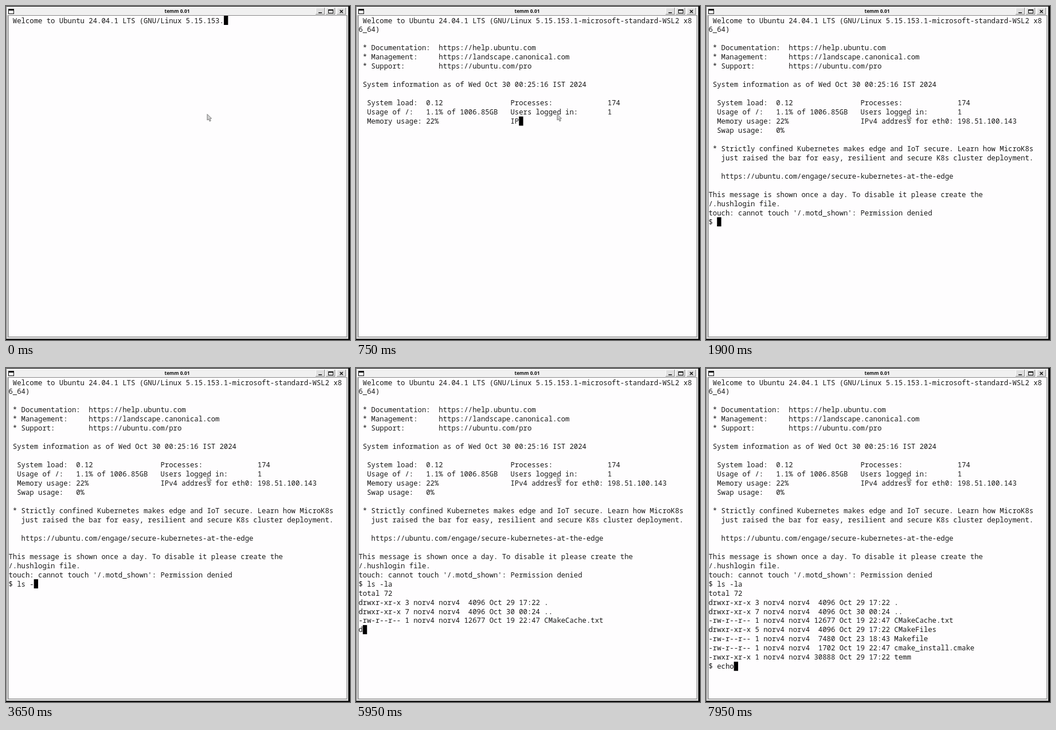
Recreate the animation shown at these times as an HTML page with a canvas. Size 600 by 582 pixels, loop 8 s.

```html
<!DOCTYPE html>
<html lang="en">
<head>
<meta charset="utf-8">
<title>Terminal</title>
<style>
html, body { margin: 0; width: 100%; height: 100%; overflow: hidden; background: #000; }
canvas { display: block; }
</style>
</head>
<body>
<canvas id="stage" width="600" height="582"></canvas>
<script>
const ctx = document.getElementById('stage').getContext('2d');
const LOOP = 8000, STEP = 50;
const CELL = { x: 4.5, y: 17, w: 7.362, h: 15.96 };

const banner = ` Welcome to Ubuntu 24.04.1 LTS (GNU/Linux 5.15.153.1-microsoft-standard-WSL2 x8
6_64)

 * Documentation:  https://help.ubuntu.com
 * Management:     https://landscape.canonical.com
 * Support:        https://ubuntu.com/pro

 System information as of Wed Oct 30 00:25:16 IST 2024

  System load:  0.12                Processes:             174
  Usage of /:   1.1% of 1006.85GB   Users logged in:       1
  Memory usage: 22%                 IPv4 address for eth0: 198.51.100.143
  Swap usage:   0%

 * Strictly confined Kubernetes makes edge and IoT secure. Learn how MicroK8s
   just raised the bar for easy, resilient and secure K8s cluster deployment.

   https://ubuntu.com/engage/secure-kubernetes-at-the-edge

This message is shown once a day. To disable it please create the
/.hushlogin file.
touch: cannot touch '/.motd_shown': Permission denied
$ `;

const listing = `
total 72
drwxr-xr-x 3 norv4 norv4  4096 Oct 29 17:22 .
drwxr-xr-x 7 norv4 norv4  4096 Oct 30 00:24 ..
-rw-r--r-- 1 norv4 norv4 12677 Oct 19 22:47 CMakeCache.txt
drwxr-xr-x 5 norv4 norv4  4096 Oct 29 17:22 CMakeFiles
-rw-r--r-- 1 norv4 norv4  7480 Oct 23 18:43 Makefile
-rw-r--r-- 1 norv4 norv4  1702 Oct 19 22:47 cmake_install.cmake
-rwxr-xr-x 1 norv4 norv4 30888 Oct 29 17:22 temm
$ `;

const text = banner + 'ls -la' + listing + 'echo';
const after = s => text.indexOf(s) + s.length;
const first = banner.length;
const second = first + 6 + listing.length;

// [time, characters shown, flows on to the next key]
const keys = [
  [0, after('5.15.153.'), true],
  [750, after('174\n  Usage of /:   1.1% of 1006.85GB   Users logged in:       1\n  Memory usage: 22%                 IP'), true],
  [1550, first],
  [3100, first + 1], [3200, first + 2], [3300, first + 3],
  [3650, first + 4], [3800, first + 5],
  [4450, first + 4], // backspace
  [5050, first + 5], [5100, first + 6],
  [5550, first + 7, true],
  [5950, after('CMakeCache.txt\nd'), true],
  [6350, after('cmake_install.cma'), true],
  [6500, second],
  [7500, second + 1], [7650, second + 2], [7750, second + 3], [7950, second + 4]
];

function shownAt(t) {
  const i = keys.findLastIndex(k => k[0] <= t);
  const [t0, n0, flows] = keys[i];
  if (!flows) return n0;
  const [t1, n1] = keys[i + 1];
  return Math.round(n0 + (n1 - n0) * (t - t0) / (t1 - t0));
}

function rect(color, x, y, w, h) {
  ctx.fillStyle = color;
  ctx.fillRect(x, y, w, h);
}

function path(points, width, color) {
  ctx.beginPath();
  points.forEach(([x, y]) => ctx.lineTo(x, y));
  ctx.lineWidth = width;
  ctx.strokeStyle = color;
}

function button(x) {
  rect('#8c8c8c', x, 3, 16, 12);
  rect('#fafafa', x, 3, 15, 11);
  rect('#dedede', x + 1, 4, 14, 10);
}

function drawWindow() {
  rect('#0c0c0c', 0, 0, 600, 582);
  rect('#777', 0, 0, 1, 580);
  rect('#d6d6d6', 1, 1, 596, 579);
  rect('#f0f0f0', 1, 1, 595, 15);
  rect('#8a8a8a', 3, 16, 592, 561);
  rect('#fefdfe', 4.5, 17, 589.5, 559);

  rect('#111', 4, 5, 10, 9);
  rect('#f4f4f4', 5, 8, 8, 5);
  ctx.fillStyle = '#111';
  ctx.font = 'bold 8.4px "Noto Sans", sans-serif';
  ctx.textAlign = 'center';
  ctx.fillText('temm 0.01', 298.5, 12.3);

  [540, 558, 577].forEach(button);
  rect('#111', 545, 11, 6, 1.5);
  rect('#111', 562, 6, 9, 7);
  rect('#dedede', 563, 8, 7, 4);
  path([[582.5, 7], [587.5, 12]], 1.6, '#111');
  ctx.stroke();
  path([[587.5, 7], [582.5, 12]], 1.6, '#111');
  ctx.stroke();
}

function drawText(count) {
  const lines = text.slice(0, count).split('\n');
  ctx.font = '12.27px "Noto Sans Mono", monospace';
  ctx.textAlign = 'left';
  ctx.fillStyle = '#181818';
  lines.forEach((line, row) => ctx.fillText(line, CELL.x, CELL.y + row * CELL.h + 12.5));
  const row = lines.length - 1;
  rect('#000', CELL.x + lines[row].length * CELL.w, CELL.y + row * CELL.h, CELL.w, CELL.h);
}

function drawPointer() {
  path([[351, 188.5], [351, 199], [353.3, 197], [355.3, 201], [357.2, 200], [355.4, 196.3], [358.5, 196]], 1, '#777');
  ctx.closePath();
  ctx.fillStyle = '#d2d2d2';
  ctx.fill();
  ctx.stroke();
}

function frame() {
  const t = Math.floor(performance.now() % LOOP / STEP) * STEP;
  drawWindow();
  drawText(shownAt(t));
  drawPointer();
  requestAnimationFrame(frame);
}
frame();
</script>
</body>
</html>
```
